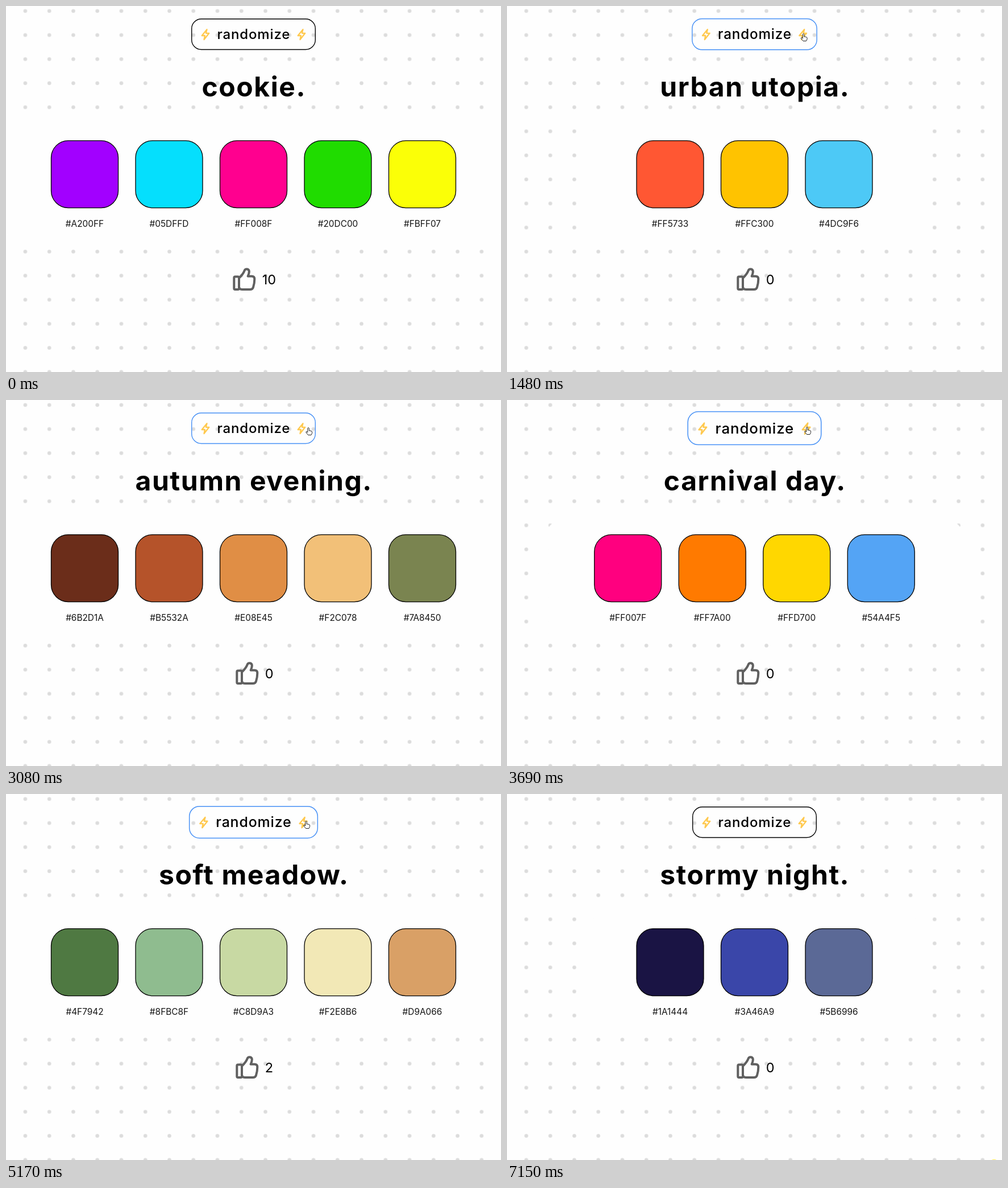
These frames come from a looping animation (871 by 643 pixels, 7210 ms). An HTML page:

```html
<!DOCTYPE html>
<html lang="en">
<head>
<meta charset="utf-8">
<title>Palette randomizer</title>
<style>
  html, body { margin: 0; width: 100%; height: 100%; overflow: hidden; background: #fefefe; }
  svg { display: block; width: 871px; height: 643px; }
  text { font-family: Montserrat, Inter, sans-serif; }
  .centered { text-anchor: middle; }
  #title { font-size: 48px; font-weight: 700; letter-spacing: .033em; }
  #button text { font-size: 24px; font-weight: 500; letter-spacing: .035em; }
  #button rect { fill: none; stroke-width: 1.4; }
  .bolt { fill: none; stroke: #ffc94f; stroke-width: 2.3; stroke-linejoin: round; }
  .swatch { stroke: #000; stroke-width: 1.3; }
  .code { font-size: 15.4px; fill: #151515; }
  #thumb { fill: none; stroke-width: 4; stroke-linejoin: round; }
  #count { font-size: 23.5px; }
  #cursor path { fill: #fff; stroke: #222; stroke-width: 1; stroke-linejoin: round; }
</style>
</head>
<body>
<svg viewBox="0 0 871 643">
  <defs>
    <pattern id="dots" x="12.8" y="-12.4" width="42.26" height="42.27" patternUnits="userSpaceOnUse">
      <circle cx="21.13" cy="21.13" r="3.3" fill="#dcdcdc"/>
    </pattern>
    <path id="boltShape" d="M353.5 41.2 344.7 52h5.2l-1.4 7 8.8-11.2h-5.4Z"/>
  </defs>
  <rect x="13" width="845" height="643" fill="url(#dots)"/>
  <g id="button">
    <rect x="326.7" y="22.7" width="217.6" height="53.8" rx="17"/>
    <use class="bolt" href="#boltShape"/>
    <use class="bolt" href="#boltShape" x="169"/>
    <text class="centered" x="435.9" y="58">randomize</text>
  </g>
  <text id="title" class="centered" x="436.3" y="159"></text>
  <g id="palette"></g>
  <g id="likes">
    <g id="thumb">
      <rect x="2" y="15.5" width="8.7" height="22.5" rx="2"/>
      <path d="M10.7 18C15 14 19 8.5 20.5 4.5 21.8 1 28 1.5 28.5 6c.2 3-1 6-2.2 8.7H33c3.7 0 5 2 5 5 0 4.500-1 10.500-2.300 14.500C34.800 37.200 33 38 30 38H16c-4 0-5.300-2-5.300-5Z"/>
    </g>
    <text id="count" x="51.500" y="29"></text>
  </g>
  <circle id="flash" r="8" fill="#ffee58" fill-opacity=".9"/>
  <g id="cursor">
    <path id="hand" d="M-1.200 1.500Q0-.5 1.300 1.500V6Q4 5.500 6 7 7 8 6.500 10.500L5 13.500H-.5L-4 9Q-4.500 7.500-3 7.500L-1.200 9Z"/>
    <path id="arrow" d="M0 0V11L2.600 8.700 4.300 12.500 6 11.800 4.400 8H8Z"/>
  </g>
</svg>
<script>
const LOOP = 7210, FRAME = 70, CENTER = 435.5, BLUE = '#4690f5';
const $ = id => document.getElementById(id);

const palettes = [
  ['cookie.', 'A200FF 05DFFD FF008F 20DC00 FBFF07', 10],
  ['urban utopia.', 'FF5733 FFC300 4DC9F6', 0],
  ['autumn evening.', '6B2D1A B5532A E08E45 F2C078 7A8450', 0],
  ['carnival day.', 'FF007F FF7A00 FFD700 54A4F5', 0],
  ['spooky pond.', '3B1414 17355A 162354 082711 222725', 0],
  ['soft meadow.', '4F7942 8FBC8F C8D9A3 F2E8B6 D9A066', 2],
  ['ender eyes.', '000000 444444 C1B4C1 E5B6FF 833E9E', 3, true],
  ['stormy night.', '1A1444 3A46A9 5B6996', 0]
].map(([title, codes, likes, liked]) => ({ title, codes: codes.split(' '), likes, liked }));

// Each click: start time, frame length, button scale per frame.
const clicks = [
  [1290, 62, [1.01, 1.04, 1.025, 1.008]],
  [2490, 65, [1.01, 1.09, 1.037, 1.008]],
  [3550, 70, [1.01, 1.09, 1.078, 1.035, 1.008]],
  [4430, 70, [1.01, 1.09, 1.037, 1.008]],
  [4980, 65, [1.01, 1.078, 1.037, 1.008]],
  [5500, 72, [1.01, 1.078, 1.037, 1.008]],
  [6120, 70, [1.01, 1.078, 1.037, 1.008]]
];

// Cursor moves: start, end, from, to, easing.
const easeOut = p => 1 - (1 - p) ** 3;
const easeInOut = p => p * p * (3 - 2 * p);
const moves = [
  [460, 950, [775, 86], [521.5, 48], easeOut],
  [3080, 3150, [532, 48], [543, 48], easeOut],
  [3350, 3420, [535, 47.5], [528, 47], easeOut],
  [6470, 6810, [560, 75], [851, 628], easeInOut]
];

function cursorAt(t) {
  const move = moves.findLast(m => t >= m[0]);
  if (!move || t >= 6880) return null;
  const [start, end, from, to, ease] = move;
  const elapsed = Math.floor((t - start) / FRAME) * FRAME;
  const p = ease(Math.min(1, elapsed / (end - start)));
  return from.map((v, i) => v + (to[i] - v) * p);
}

function clickAt(t) {
  const index = clicks.findLastIndex(c => t >= c[0]);
  if (index < 0) return { palette: 0, scale: 1, pressed: false };
  const [start, step, scales] = clicks[index];
  const frame = Math.floor((t - start) / step);
  return { palette: index + (frame > 0), scale: scales[frame] ?? 1, pressed: frame === 0 };
}

function showPalette({ title, codes, likes, liked }) {
  const spacing = 148.5, left = CENTER - spacing * (codes.length - 1) / 2;
  const panelX = left - 140.5;
  $('title').textContent = title;
  $('palette').innerHTML =
    `<rect x="${panelX}" y="216" width="${871 - 2 * panelX}" height="189" rx="14" fill="#fefefe"/>` +
    codes.map((code, i) => {
      const x = left + i * spacing;
      return `<rect class="swatch" x="${x - 59}" y="236.6" width="118" height="118" rx="30" fill="#${code}"/>
        <text class="code centered" x="${x}" y="387.500">#${code}</text>`;
    }).join('');
  $('likes').setAttribute('transform', `translate(${likes > 9 ? 399.3 : 404.3} 460)`);
  $('thumb').setAttribute('stroke', liked ? BLUE : '#606060');
  $('count').setAttribute('fill', liked ? BLUE : '#000');
  $('count').textContent = likes;
}

const show = (id, visible) => $(id).setAttribute('visibility', visible ? 'visible' : 'hidden');
let shown = -1;

function render(now) {
  const t = now % LOOP;
  const { palette, scale, pressed } = clickAt(t);
  if (palette !== shown) showPalette(palettes[shown = palette]);

  const cursor = cursorAt(t);
  const hover = !!cursor && Math.abs(cursor[0] - CENTER) < 109 && Math.abs(cursor[1] - 49.5) < 27;
  $('button').setAttribute('transform',
    `translate(${CENTER} 49.5) scale(${scale}) translate(${-CENTER} -49.5)`);
  $('button').firstElementChild.setAttribute('stroke', hover ? BLUE : '#000');

  show('hand', hover);
  show('arrow', cursor && !hover);
  if (cursor) $('cursor').setAttribute('transform', `translate(${cursor})`);

  const leaving = t >= 7150;
  const [x, y] = leaving ? [857, 649.8] : cursor || [0, 0];
  show('flash', pressed || leaving);
  $('flash').setAttribute('cx', x);
  $('flash').setAttribute('cy', y);
}

function tick() {
  render(performance.now());
  requestAnimationFrame(tick);
}
tick();
</script>
</body>
</html>
```
